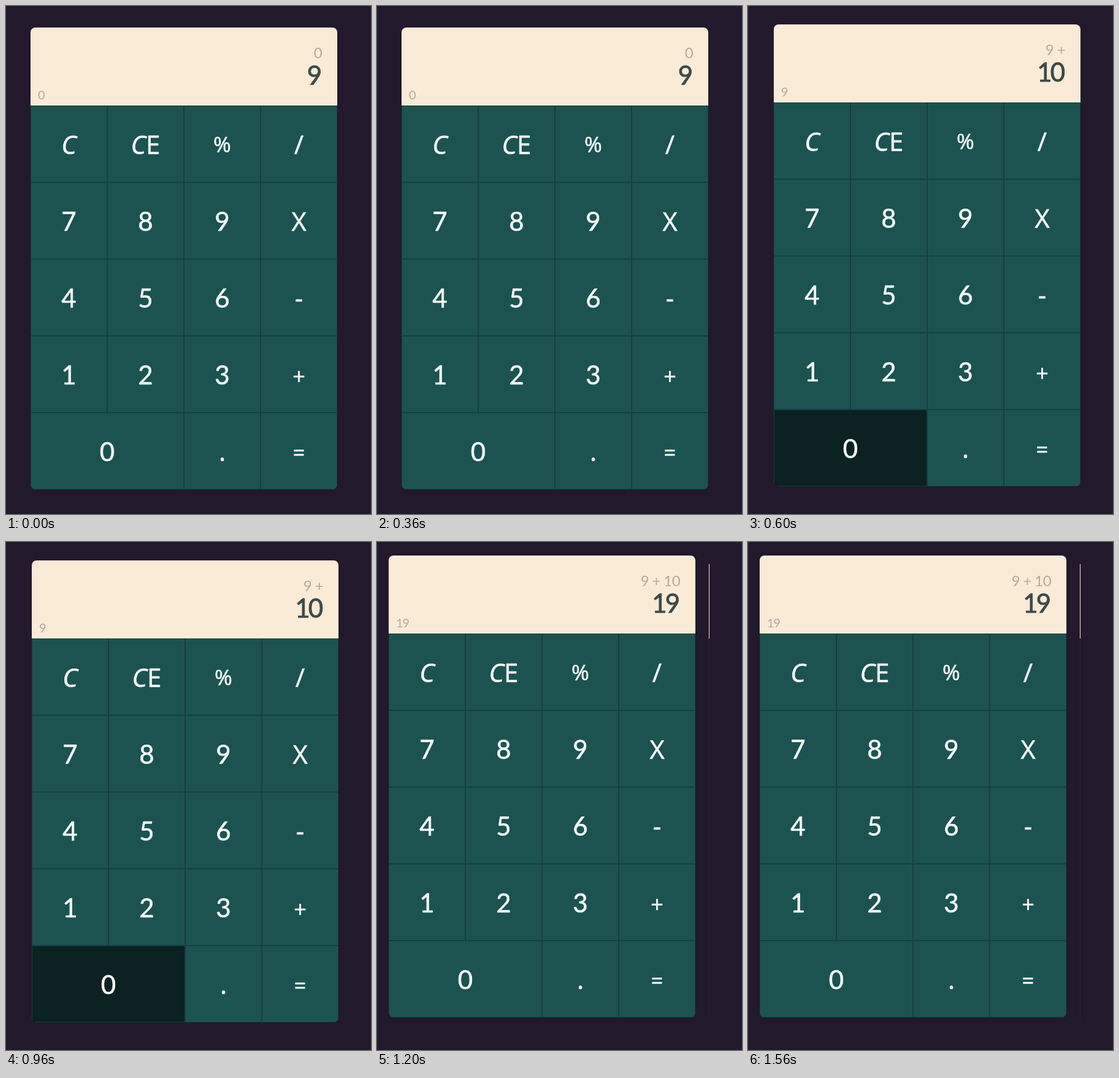
Write an HTML page that moves like this. It is 595 by 827 pixels and loops after 1.8 s.

```html
<!DOCTYPE html>
<html lang="en">
<meta charset="utf-8">
<title>Calculator</title>
<style>
  html, body { margin: 0; width: 100%; height: 100%; overflow: hidden; background: #22192c; }
  svg { display: block; }
  text { font: 42px Lato, sans-serif; stroke-linejoin: round; }
  .key rect { fill: #1c5351; stroke: #163f42; }
  .key text { fill: #f9fbfa; stroke: #f9fbfa; stroke-width: .6; text-anchor: middle; }
  .key .symbol { font-family: "Open Sans", sans-serif; }
  .key.pressed rect { fill: #0b2122; }
  #value { fill: #3c4a4a; stroke: #3c4a4a; stroke-width: .9; letter-spacing: -3px; text-anchor: end; }
  #history { font-size: 24px; letter-spacing: -.6px; fill: #b2aca0; text-anchor: end; }
  #total { font-size: 20px; letter-spacing: -1px; fill: #b2aca0; }
</style>
<svg width="595" height="827">
  <defs><clipPath id="corners"><rect width="500" height="752" rx="8"/></clipPath></defs>
  <g id="edge">
    <path d="M541.5 36V157" stroke="#faebd7"/>
    <path d="M541.5 157V776" stroke="#2c2236"/>
  </g>
  <g id="card" clip-path="url(#corners)">
    <rect width="500" height="128" fill="#faebd7"/>
    <text id="history" x="475" y="50"></text>
    <text id="value" x="472" y="93"></text>
    <text id="total" x="12" y="117"></text>
  </g>
</svg>
<script>
const $ = id => document.getElementById(id);
const card = $('card');
const CELL = 125, DISPLAY = 127;
const rows = ['C CE % /', '7 8 9 X', '4 5 6 -', '1 2 3 +', '0 . ='];
// Font size and baseline shift of the smaller symbols
const adjust = { '%': [35, -3], '+': [36, 0], '=': [34, -1] };
const steps = [
  { x: 40, y: 35, history: '0', value: '9', total: '0' },
  { x: 42, y: 30, history: '9 +', value: '10', total: '9', pressed: '0' },
  { x: 19, y: 22, history: '9 + 10', value: '19', total: '19', edge: true }
];

function add(parent, tag, attributes) {
  const node = document.createElementNS('http://www.w3.org/2000/svg', tag);
  for (const name in attributes) node.setAttribute(name, attributes[name]);
  return parent.appendChild(node);
}

const keys = {};
rows.forEach((row, r) => {
  let x = 0;
  const y = DISPLAY + r * CELL;
  for (const label of row.split(' ')) {
    const width = label === '0' ? 2 * CELL : CELL;
    const [size, shift] = adjust[label] || [42, 0];
    const key = keys[label] = add(card, 'g', { class: 'key' });
    add(key, 'rect', { x: x + .5, y: y + .5, width: width - 1, height: CELL - 1 });
    const text = add(key, 'text', {
      x: x + width / 2, y: y + 79 + shift,
      class: /\d/.test(label) ? 'digit' : 'symbol', style: `font-size:${size}px`
    });
    for (const char of label)
      add(text, 'tspan', char === 'C' ? { 'font-style': 'italic' } : {}).textContent = char;
    x += width;
  }
});

let shown;
function draw(now) {
  const step = steps[Math.floor(now % 1800 / 600)];
  if (step !== shown) {
    shown = step;
    card.setAttribute('transform', `translate(${step.x} ${step.y})`);
    for (const id of ['history', 'value', 'total']) $(id).textContent = step[id];
    for (const label in keys) keys[label].classList.toggle('pressed', label === step.pressed);
    $('edge').style.display = step.edge ? '' : 'none';
  }
  requestAnimationFrame(() => draw(performance.now() - start));
}
const start = performance.now();
draw(0);
</script>
</html>
```
